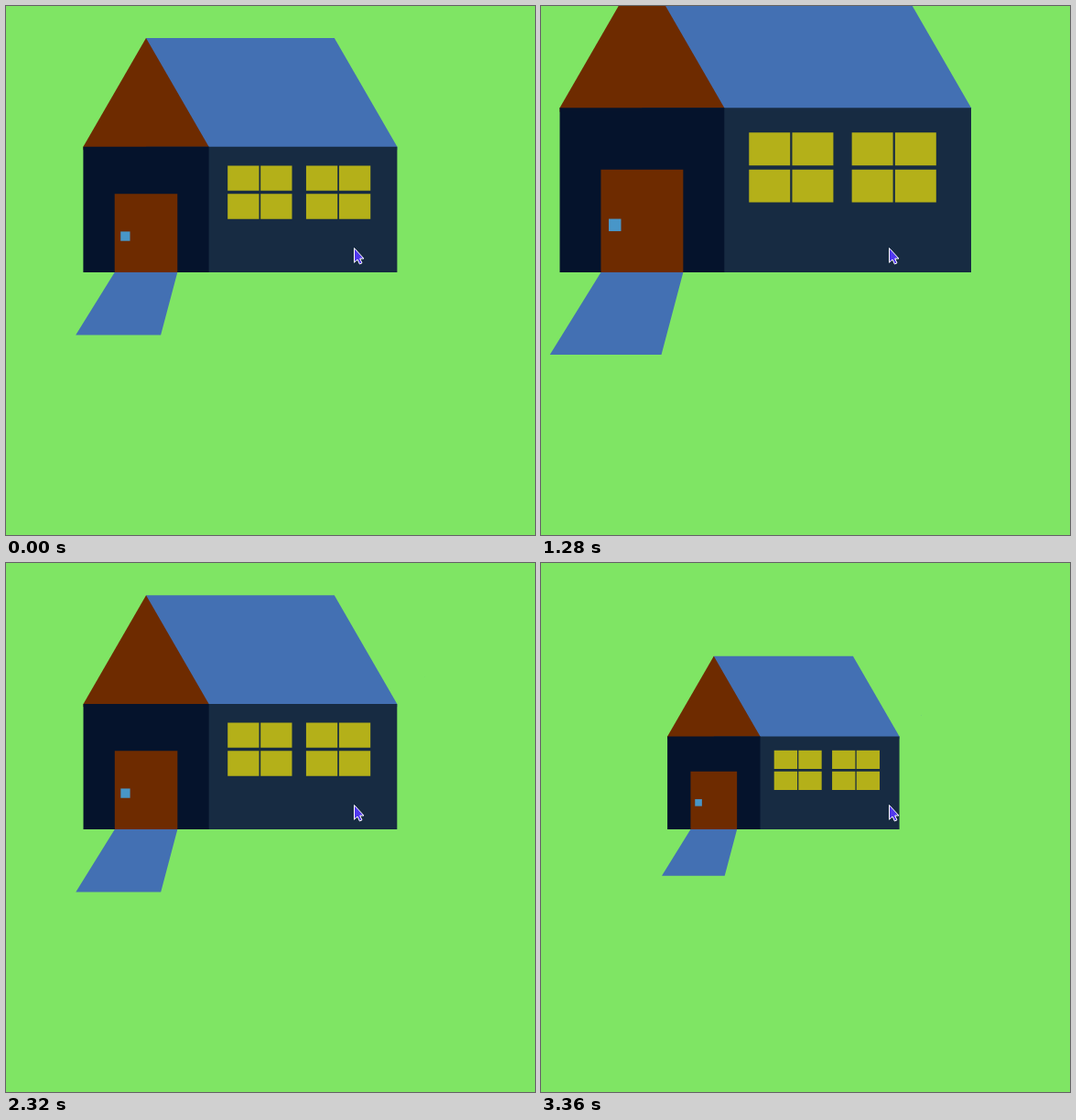
An HTML page that plays this animation: 578x578 px, repeating every 3.44 s.

```html
<!DOCTYPE html>
<html lang="en">
<head>
<meta charset="utf-8">
<title>House zoom</title>
<style>
  html, body { margin: 0; width: 100%; height: 100%; overflow: hidden; background: #7fe564; }
  svg { display: block; width: 578px; height: 578px; }
</style>
</head>
<body>
<svg viewBox="0 0 578 578">
  <!-- One unit is half the width of the front wall; the ground line is y = 0.
       Lower parts reach a little under upper ones so that no seams show. -->
  <g id="house">
    <path fill="#4370b3" d="M-2.5 -.05V0L-3.12 1H-1.765L-1.5 0V-.05Z"/>
    <path fill="#4370b3" d="M-2 -3.732H1L2 -2V-1.95H-2Z"/>
    <path fill="#6e2b00" d="M-2 -3.732L-1 -2V-1.95H-3V-2Z"/>
    <path fill="#172b42" d="M-2 -2H2V0H-2Z"/>
    <path fill="#05132c" d="M-3 -2H-1V0H-3Z"/>
    <path fill="#6e2b00" d="M-2.5 -1.25H-1.5V0H-2.5Z"/>
    <path fill="#4896c8" d="M-2.405 -.65h.15v.15h-.15Z"/>
    <path id="panes" fill="#b4b019"/>
  </g>
  <path fill="#5138ee" stroke="#fff" stroke-linejoin="round"
        d="M380.5 264.5V280.3L384 277L386.4 282L389 280.8L386.7 276H391Z"/>
</svg>
<script>
  const FRAME = 80, LOOP = 3440;
  const ANCHOR = [290.2, 291];
  const START = 343, LARGE = 449.5, SMALL = 253.5;   // house widths

  const house = document.getElementById("house");

  // Each window is two by two panes
  let panes = "";
  for (const left of [-.7, .55])
    for (const dx of [0, .525])
      for (const y of [-1.7, -1.25]) panes += `M${left + dx} ${y}h.5v.4h-.5Z`;
  document.getElementById("panes").setAttribute("d", panes);

  const progress = (t, start, length) => Math.min(1, Math.max(0, (t - start) / length));
  const easeInOut = p => p * p * (3 - 2 * p);
  const easeOut = p => 1 - (1 - p) ** 1.5;

  // Zoom in, pause, zoom out
  const widthAt = t => START
    + (LARGE - START) * easeInOut(progress(t, 448, 672))
    - (LARGE - SMALL) * easeOut(progress(t, 1651, 1640));

  function draw() {
    const t = Math.floor(performance.now() % LOOP / FRAME) * FRAME;
    house.setAttribute("transform", `translate(${ANCHOR}) scale(${widthAt(t) / 5})`);
    requestAnimationFrame(draw);
  }
  draw();
</script>
</body>
</html>
```
